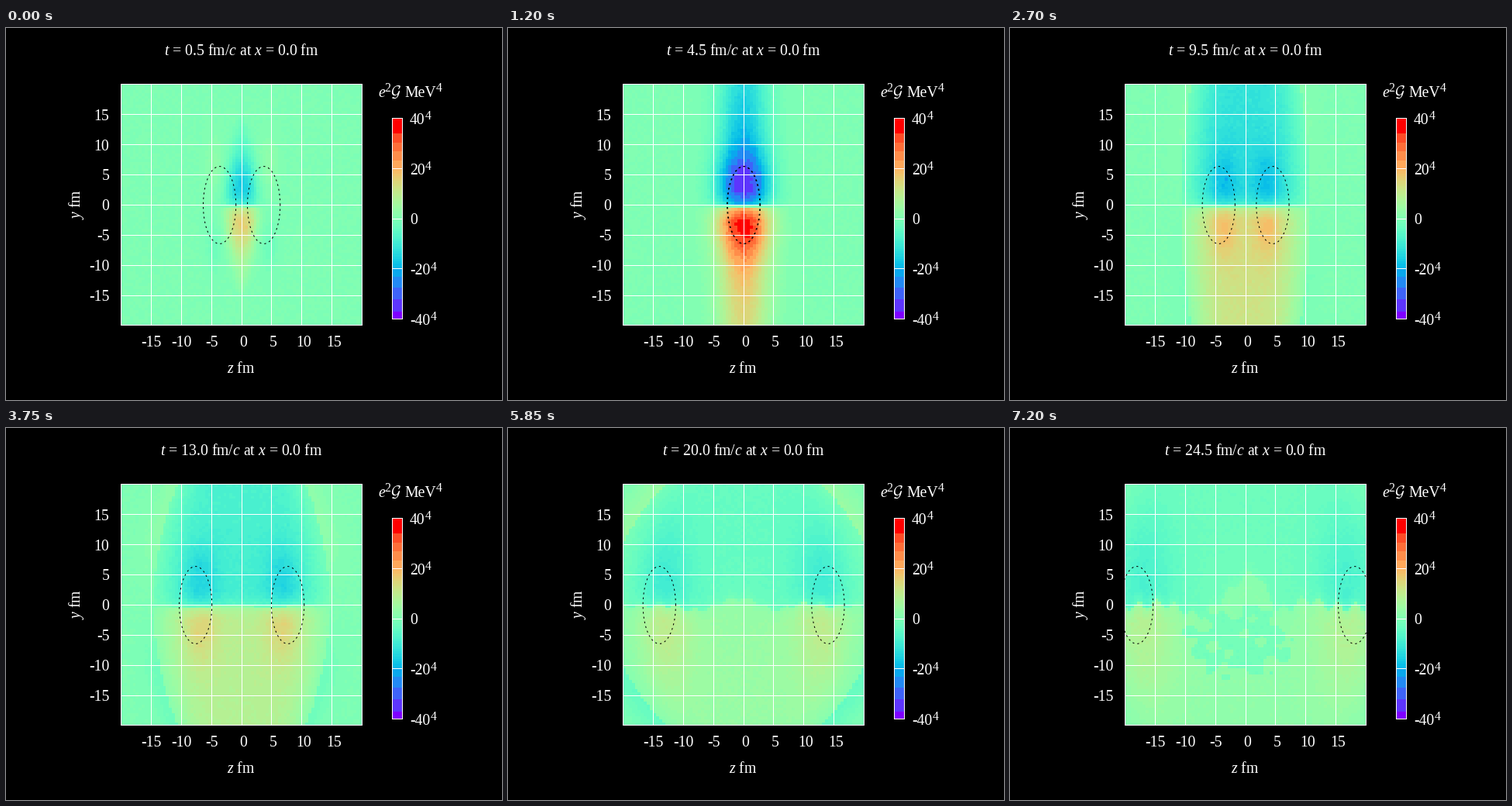
Recreate the animation shown at these times as a matplotlib script. Size 640 by 480 pixels, loop 7.35 s.

```python
import numpy as np
import matplotlib.pyplot as plt
from matplotlib.animation import FuncAnimation
from matplotlib.patches import Rectangle

plt.rcParams.update({
    "font.family": "Liberation Serif",
    "mathtext.fontset": "custom",
    "mathtext.rm": "Liberation Serif",
    "mathtext.it": "Liberation Serif:italic",
    "text.color": "white",
    "toolbar": "None",
})

FRAMES, STEP = 49, 150
DPI = 100
EM = 19.8                       # font size in pixels
LEFT, RIGHT, TOP, BOTTOM = 148, 460, 72, 384
BAR = (498, 512, 116, 376)
SPEED, T_MEET, RADIUS = 0.906, 4.55, 6.42
SQUEEZE = np.sqrt(1 - SPEED ** 2)

fig = plt.figure(figsize=(6.4, 4.8), dpi=DPI, facecolor="black")
ax = fig.add_axes([0, 0, 1, 1])
ax.set_xlim(0, 640)
ax.set_ylim(480, 0)
ax.axis("off")
ax.set_autoscale_on(False)


def px(z):
    return 304.1 + 7.775 * z


def py(y):
    return 228.5 - 7.775 * y


def label(x, y, s, size=EM, **kw):
    kw.setdefault("va", "baseline")
    return ax.text(x, y, s, fontsize=size * 72 / DPI, **kw)


def rule(x, y):
    ax.plot(x, y, color="white", lw=0.72, zorder=3, solid_capstyle="butt", snap=False)


def frame(x0, x1, y0, y1):
    ax.add_patch(Rectangle((x0 + .5, y0 + .5), x1 - x0 - 1, y1 - y0 - 1,
                           fill=False, ec="white", lw=0.72, zorder=3, snap=False))


# Rainbow palette: fine steps in the middle, coarse ones at the ends
EDGES = np.concatenate([[0, .035, .1, .155, .21], np.arange(.25, .755, .0125),
                        [.79, .835, .88, .925, 1]])
LEVELS = (EDGES[:-1] + EDGES[1:]) / 2
LEVELS[0], LEVELS[-1] = 0, 1


def rainbow(f):
    i = np.clip(np.searchsorted(EDGES, f, side="right") - 1, 0, len(LEVELS) - 1)
    x = LEVELS[i]
    rgb = np.stack([np.abs(2 * x - .5), np.sin(np.pi * x), np.cos(np.pi * x / 2)], -1)
    return np.clip(rgb, 0, 1)


# Field strength over time
KEYS = [.5, 2.5, 4.5, 7, 9.5, 13, 16, 20, 24.5]
CURVES = {
    "base": [.27, .45, .61, .46, .34, .23, .15, .115, .085],
    "lobe": [.2, .29, .36, .24, .14, .15, .16, .15, .14],
    "fall": [.02, .02, .022, .014, .007, .006, .006, .008, .01],
    "bend": [0, 0, 0, .002, .004, .01, .019, .024, .019],
    "power": [2.5, 2.2, 2, 2.8, 4, 6, 6, 6, 6],
    "fill": [.82, .82, .82, .85, .88, .93, .95, .95, .95],
    "tall": [4.5, 4.5, 4.5, 4.7, 5, 6, 8.5, 11.5, 14],
}
CELLS = np.arange(-19.75, 20, .5)
Z, Y = np.meshgrid(CELLS, CELLS[::-1])
AZ, AY = np.abs(Z), np.abs(Y)


def gauss(x, mid, width):
    return np.exp(-((x - mid) / width) ** 2)


def field(t, rng):
    c = {k: np.interp(t, KEYS, v) for k, v in CURVES.items()}
    late = np.clip((t - 12) / 12.5, 0, 1)

    # The zero line gets ragged at late times
    wave = 2.6 * np.cos(.48 * (Z + 2)) * gauss(Z, 0, 11) + .7 * np.sin(2.1 * Z + .3 * t)
    yc = Y + .25 - late ** 2 * wave
    yc = yc - 6 * late ** 4 * gauss(Z, 2, 2.8)
    side = np.sign(yc)
    near = np.clip(np.abs(yc) / 2.5, 0, 1) ** .25

    # Light front and the profile inside it
    front = 1.12 * t - c["bend"] * Y ** 2
    reach = np.sqrt(np.clip(1 - AY / (15 + 25 * (t - .5)), .001, 1))
    width = np.maximum((2.55 + .4 * t) * reach, c["fill"] * front)
    profile = np.exp(-np.minimum(AZ / width, 6) ** c["power"])
    if t > 8:
        profile = np.where(AZ > front, 0, profile)

    zp = max(0, SPEED * (t - 5.4))
    spot = gauss(AZ, zp, .5 + .19 * t) if t > 8 else gauss(AZ, zp, 2.4 + 2 * (8 - t))
    lobes = c["lobe"] * spot * gauss(AY, 4, c["tall"])
    u = -side * near * profile * (c["base"] * (1 - c["fall"] * AY) + lobes)
    if t < 4.5:
        u *= 1 - (1 - reach) * (4.5 - t) / 4

    # Weak opposite sign ahead of the front
    ahead = np.where(AZ > front, gauss(AZ - front, 0, .2 * t), 0)
    u += np.sign(Y) * .1 * np.clip((t - 7) / 9, 0, 1) * np.clip(AY / 9 - .3, 0, 1) * ahead
    early = np.clip((2.5 - t) / 2, 0, 1)
    u += np.sign(Y) * .07 * early * gauss(AZ, 4.6, 1.3) * gauss(AY, 7, 4)

    # Patchy remnant near the centre
    u *= 1 - .5 * late ** 2 * gauss(Z, 0, 7) * gauss(Y, 0, 8)
    patch = (np.sin(.9 * Z + .7 * Y + .3 * t) + np.sin(1.7 * Z - 1.1 * Y)
             + np.sin(.5 * Z + 1.9 * Y + 2))
    blob = gauss(Z, -1, 7.5) * gauss(Y, -6, 5) * late ** 5
    u = np.where((blob * (patch + 2.2) > .75) & (Y < 0), -.045, u)

    return u + rng.normal(0, 1, u.shape) * (.003 + .02 * np.abs(u))


image = ax.imshow(np.zeros(Z.shape + (3,)), extent=(LEFT, RIGHT, BOTTOM, TOP),
                  interpolation="nearest", aspect="auto", zorder=1)
frame(LEFT, RIGHT, TOP, BOTTOM)
for v in range(-15, 20, 5):
    gx, gy = np.floor(px(v)) + .5, np.floor(py(v)) + .5
    rule([gx, gx], [TOP, BOTTOM])
    rule([LEFT, RIGHT], [gy, gy])
    label(px(v) + (2.2 if v >= 0 else 0), 411, str(v), ha="center")
    label(133.5, py(v) + 6.8, str(v), ha="right")

label(303.5, 445, "$z$ fm", ha="center")
label(91, 228, "$y$ fm", ha="center", va="center", rotation=90)

# Colour bar
x0, x1, y0, y1 = BAR
ramp = rainbow(np.linspace(1, 0, y1 - y0))[:, None]
ax.imshow(ramp, extent=(x0, x1, y1, y0), interpolation="nearest", aspect="auto", zorder=1)
frame(*BAR)
for k, v in enumerate((40, 20, 0, -20, -40)):
    y = y0 + .5 + k * (y1 - y0 - 1) / 4
    rule([x0, x1], [np.floor(y) + .5] * 2)
    label(521, y + 7.3, str(v))
    if v:
        label(521 + EM * (1 + (v < 0) / 3), y + 1.8, "4", .8 * EM)

label(480, 89, "$e$")
label(488.5, 81.5, "2", .8 * EM)
label(496.5, 89, r"$\mathcal{G}$", math_fontfamily="cm")
label(514, 89, "MeV")
label(554.5, 82.5, "4", .8 * EM)

title = label(303.5, 35, "", ha="center")
window = Rectangle((LEFT, TOP), RIGHT - LEFT, BOTTOM - TOP, transform=ax.transData)
nuclei = []
for _ in range(2):
    line, = ax.plot([], [], color="black", lw=.75, dashes=(2.2, 3.8), zorder=4,
                    dash_capstyle="butt")
    line.set_clip_path(window)
    nuclei.append(line)
ANGLE = np.linspace(0, 2 * np.pi, 181)


def draw(i):
    t = .5 + .5 * i
    image.set_data(rainbow((field(t, np.random.default_rng(i)) + 1) / 2))
    title.set_text(f"$t$ = {t:.1f} fm/$c$ at $x$ = 0.0 fm")
    for line, way in zip(nuclei, (-1, 1)):
        mid = way * SPEED * (t - T_MEET)
        line.set_data(px(mid + RADIUS * SQUEEZE * np.cos(ANGLE)),
                      py(RADIUS * np.sin(ANGLE)))
    return [image, title, *nuclei]


anim = FuncAnimation(fig, draw, frames=FRAMES, interval=STEP, repeat=True,
                     repeat_delay=0, blit=False)
plt.show()
```
